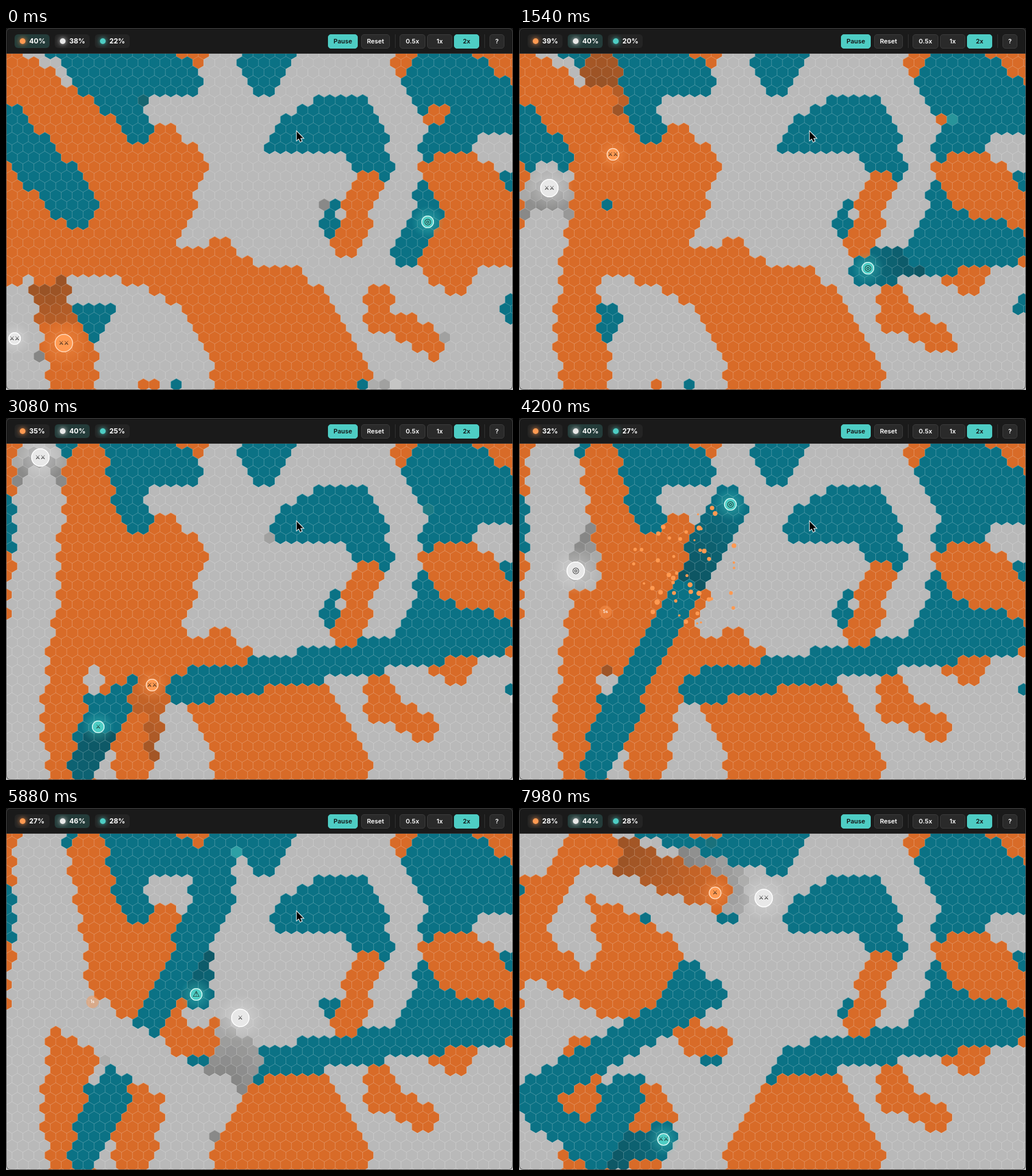
An HTML page with a canvas for the animation above (8 s loop, 885x633 px).

```html
<!DOCTYPE html>
<html lang="en">
<head>
<meta charset="utf-8">
<title>Hex territory</title>
<style>
html, body { margin: 0; width: 100%; height: 100%; overflow: hidden; background: #1a1a1a; }
#stage { position: relative; width: 885px; height: 633px; overflow: hidden; font: 600 11px Inter, sans-serif; color: #fff; }
canvas { position: absolute; left: 0; top: 0; }
header { position: absolute; left: 0; top: 0; width: 885px; height: 45px; background: #1a1a1a; border-bottom: 1px solid #333; box-sizing: border-box; }
header * { position: absolute; box-sizing: border-box; }
.chip { top: 11px; width: 61px; height: 24px; border-radius: 6px; background: #242424; font-weight: 700; font-size: 12px; line-height: 24px; }
.chip.lead { background: #243c3a; }
.chip i { left: 9px; top: 7px; width: 10px; height: 10px; border-radius: 50%; box-shadow: 0 0 8px currentColor; background: currentColor; }
.chip span { left: 26px; }
.button { top: 11px; height: 25px; line-height: 23px; text-align: center; border: 1px solid #3c3c3c; border-radius: 5px; background: #2a2a2a; }
.button.on { background: #4ecdc4; border-color: #4ecdc4; color: #111; }
.rule { top: 11px; width: 1px; height: 24px; background: #333; }
#frame { position: absolute; inset: 0; border: 1px solid #444; border-radius: 8px; }
</style>
</head>
<body>
<div id="stage">
  <canvas id="board" width="885" height="633"></canvas>
  <header id="bar">
    <div class="button on" style="left:562px;width:52px">Pause</div>
    <div class="button" style="left:620px;width:50px">Reset</div>
    <div class="rule" style="left:679px"></div>
    <div class="button" style="left:687px;width:45px">0.5x</div>
    <div class="button" style="left:735px;width:44px">1x</div>
    <div class="button on" style="left:782px;width:44px">2x</div>
    <div class="rule" style="left:835px"></div>
    <div class="button" style="left:844px;width:26px">?</div>
  </header>
  <div id="frame"></div>
</div>
<script>
const LOOP = 8000, START = -490, STEP = 70, FADE = 450;
const COLS = 48, ROWS = 37, HEX_W = 19.13, HEX_R = HEX_W / Math.sqrt(3);
const ORANGE = 0, WHITE = 1, TEAL = 2;
const DEATH = 3750, RESPAWN = 6250, POINTER_GONE = 6860;
const ctx = document.getElementById('board').getContext('2d');
const rand = n => { const v = Math.sin(n * 12.9898 + 4.1) * 43758.5453; return v - Math.floor(v); };
const lerp = (a, b, u) => a + (b - a) * u;
const rgb = c => `rgb(${c.map(Math.round)})`;
const mix = (a, b, u) => a.map((v, i) => lerp(v, b[i], u));

// each leg: arrival time, then the bounce points and the end, taken at constant speed
const teams = [
  { base: [216, 107, 40], dark: [152, 82, 38], light: [255, 154, 82], rim: '#ffd9bd', reach: 31,
    size: t => t < 700 ? 16 : 11, share: [40, 39, 35, 32, 27, 26, 28],
    icons: [[0, '⚔⚔'], [RESPAWN, '⚔']],
    legs: [[-450, 68, 425], [0, 101, 551], [1540, 106, 618, 118, 300, 145, 60, 164, 221], [3080, 225, 620, 255, 467],
      [DEATH, 300, 255], [RESPAWN, 151, 339], [6500, 151, 339], [7140, 12, 245, 33, 176], [LOOP, 112, 56, 351, 152]] },
  { base: [185, 185, 185], dark: [132, 132, 131], light: [232, 232, 232], rim: '#fff', reach: 41,
    size: t => t < 700 ? 11 : 16, share: [38, 40, 40, 40, 46, 45, 44],
    icons: [[0, '⚔⚔'], [3600, '◎'], [5000, '⚔'], [6500, '⚔⚔']],
    legs: [[-450, 35, 610], [0, 15, 543], [1540, 53, 280], [3080, 60, 69], [4200, 61, 60, 99, 267],
      [5880, 105, 345, 360, 520, 405, 440, 409, 367], [7140, 415, 315, 240, 150, 20, 80, 99, 55], [LOOP, 435, 160]] },
  { base: [11, 114, 133], dark: [14, 84, 97], light: [78, 205, 196], rim: '#d5f5f2', reach: 28,
    size: () => 11, share: [22, 20, 25, 27, 28, 28, 28],
    icons: [[0, '◎'], [2300, '⚔'], [3600, '◎'], [5000, '⚠'], [6500, '⚔⚔']],
    legs: [[0, 736, 339], [1540, 872, 380, 609, 420], [3080, 200, 490, 132, 615, 161, 540], [4200, 369, 151],
      [5880, 374, 60, 332, 210, 332, 326], [7140, 12, 505, 36, 529], [LOOP, 140, 610, 258, 578]] }
];
const shareTimes = [0, 1540, 3080, 4200, 5880, 7140, LOOP];

function timeline(legs) {
  const keys = [];
  for (const [arrival, ...coords] of legs) {
    let from = keys.at(-1) || { time: arrival, x: coords[0], y: coords[1] };
    const left = from.time, stops = [];
    for (let i = 0, way = 0; i < coords.length; i += 2) {
      const [x, y] = coords.slice(i, i + 2);
      way += Math.hypot(x - from.x, y - from.y);
      stops.push(from = { x, y, way });
    }
    for (const s of stops) keys.push({ x: s.x, y: s.y, time: from.way ? lerp(left, arrival, s.way / from.way) : arrival });
  }
  return keys;
}
for (const team of teams) team.keys = timeline(team.legs);

// starting land, later ones on top; with a radius the points form a thick line, without one an outline
const land = [
  [ORANGE, 0, '-9,20 235,180 290,166 354,242 298,390 375,368 430,415 518,415 645,600 610,645 358,645 355,560 305,482 180,433 45,433 -9,468'],
  [ORANGE, 0, '68,515 140,515 162,570 160,645 30,645'],
  [TEAL, 0, '62,30 165,150 195,152 215,202 245,202 258,168 225,150 235,118 335,118 346,90 330,30'],
  [ORANGE, 0, '290,30 362,30 330,74'],
  [TEAL, 41, '0,175 118,305'],
  [TEAL, 0, '403,30 408,80 430,118 468,118 510,30'],
  [TEAL, 0, '540,118 632,118 682,243 660,268 608,250 595,218 455,218 470,167'],
  [TEAL, 0, '536,301 590,301 568,372'],
  [ORANGE, 24, '630,278 612,330 597,375'],
  [TEAL, 0, '710,30 690,90 735,165 720,228 765,230 815,218 825,185 899,185 899,30'],
  [ORANGE, 0, '668,30 718,30 690,88'],
  [ORANGE, 0, '795,30 899,30 899,112'],
  [ORANGE, 13, '742,152 760,152'],
  [ORANGE, 0, '728,236 770,218 815,218 899,290 899,417 823,417 800,467 768,467 720,415'],
  [TEAL, 21, '728,288 742,325 697,396'],
  [TEAL, 21, '890,262'],
  [TEAL, 20, '888,491'],
  [ORANGE, 23, '652,470 655,507 750,552'],
  [TEAL, 0, '118,483 186,483 180,520 152,552'],
  [TEAL, 15, '5,624'],
  [ORANGE, 11, '250,624'], [TEAL, 11, '289,624'], [TEAL, 11, '632,624'], [ORANGE, 11, '671,624']
].map(([team, radius, text]) => ({ team, radius, points: text.split(' ').map(p => p.split(',').map(Number)) }));

function lineDistance(x, y, [ax, ay], [bx, by]) {
  const dx = bx - ax, dy = by - ay;
  const u = Math.max(0, Math.min(1, ((x - ax) * dx + (y - ay) * dy) / (dx * dx + dy * dy || 1)));
  return Math.hypot(x - ax - u * dx, y - ay - u * dy);
}

function covers({ radius, points }, x, y) {
  if (radius) return points.some((p, i) => lineDistance(x, y, points[Math.max(0, i - 1)], p) < radius);
  let hit = false;
  points.forEach(([ax, ay], i) => {
    const [bx, by] = points.at(i - 1);
    if (ay > y !== by > y && x < (bx - ax) * (y - ay) / (by - ay) + ax) hit = !hit;
  });
  return hit;
}

function hex(path, x, y, r) {
  for (let k = 0; k < 6; k++) {
    const a = (k + 0.5) * Math.PI / 3;
    path[k ? 'lineTo' : 'moveTo'](x + r * Math.cos(a), y + r * Math.sin(a));
  }
  path.closePath();
}

const cells = [], grid = new Path2D();
for (let r = 0; r < ROWS; r++) for (let c = 0; c < COLS; c++) {
  const x = 0.8 + HEX_W * (c + r % 2 / 2), y = 44.2 + HEX_R * 1.5 * r;
  const owner = land.findLast(l => covers(l, x, y))?.team ?? WHITE;
  const shape = new Path2D();
  hex(shape, x, y, HEX_R + 0.3);
  hex(grid, x, y, HEX_R);
  cells.push({ x, y, r, c, owner, shape, log: [{ time: -1e5, team: owner }] });
}
const cellAt = (r, c) => c >= 0 && c < COLS ? cells[r * COLS + c] : undefined;
for (const cell of cells) {
  const { r, c } = cell, s = c + r % 2;
  cell.near = [cellAt(r, c - 1), cellAt(r, c + 1), cellAt(r - 1, s - 1), cellAt(r - 1, s),
    cellAt(r + 1, s - 1), cellAt(r + 1, s)].filter(Boolean);
}

function position(team, t) {
  const { keys } = team;
  if (t < keys[0].time || team === teams[ORANGE] && t >= DEATH && t < RESPAWN) return null;
  const i = Math.max(1, keys.findIndex(k => k.time >= t));
  const a = keys[i - 1], b = keys[i], u = (t - a.time) / (b.time - a.time);
  return [lerp(a.x, b.x, u), lerp(a.y, b.y, u)];
}

function claim(cell, team, time, lone) {
  cell.owner = team;
  cell.log.push({ time, team, lone });
}

// cells mostly surrounded by one rival change hands after a while
function erode(time) {
  const flips = [];
  cells.forEach((cell, i) => {
    const count = [0, 0, 0];
    for (const n of cell.near) count[n.owner]++;
    const rival = count.findIndex((n, k) => n >= 4 && k !== cell.owner);
    if (rival >= 0 && rand(i * 7.3 + time) < 0.05) flips.push([cell, rival]);
  });
  for (const [cell, rival] of flips) claim(cell, rival, time, true);
}

for (let t = START; t <= LOOP; t += 10) {
  teams.forEach((team, k) => {
    const p = position(team, t);
    if (!p) return;
    for (const cell of cells)
      if (cell.owner !== k && Math.hypot(cell.x - p[0], cell.y - p[1]) < team.reach) claim(cell, k, t);
  });
  if (t % STEP === 0) erode(t);
}

function disc(x, y, r, fill) {
  ctx.beginPath();
  ctx.arc(x, y, r, 0, 7);
  ctx.fillStyle = fill;
  ctx.fill();
}

function label(text, x, y, font, fill) {
  ctx.font = font;
  ctx.fillStyle = fill;
  ctx.textAlign = 'center';
  ctx.textBaseline = 'middle';
  ctx.fillText(text, x, y);
}

// claimed land darkens with age, then snaps back to its plain colour
function drawCells(t) {
  for (const cell of cells) {
    const { time, team, lone } = cell.log.findLast(e => e.time <= t);
    const { base, dark, light } = teams[team];
    const age = (t - time) / FADE;
    const fresh = lone ? mix(base, light, 0.5) : base;
    ctx.fillStyle = rgb(age < 1 ? mix(fresh, dark, age) : base);
    ctx.fill(cell.shape);
  }
  ctx.strokeStyle = 'rgba(255,255,255,.13)';
  ctx.lineWidth = 1;
  ctx.stroke(grid);
}

function drawBall(team, t) {
  const p = position(team, t);
  if (!p) return;
  const [x, y] = p, r = team.size(t), glow = ctx.createRadialGradient(x, y, r, x, y, r * 2.6);
  glow.addColorStop(0, `rgba(${team.light},.3)`);
  glow.addColorStop(1, `rgba(${team.light},0)`);
  disc(x, y, r * 2.6, glow);
  disc(x, y, r, rgb(team.light));
  ctx.beginPath();
  ctx.arc(x, y, r - 0.7, 0, 7);
  ctx.strokeStyle = team.rim;
  ctx.lineWidth = 1.5;
  ctx.stroke();
  const icon = team.icons.findLast(e => e[0] <= t)[1];
  label(icon, x, y, `${icon[0] === '⚔' ? 10 : 14}px "DejaVu Sans", sans-serif`, '#111');
}

function drawDeath(t) {
  if (t < DEATH || t >= RESPAWN) return;
  const age = (t - DEATH) / 1000;
  ctx.globalAlpha = 0.45;
  disc(151, 339, 11, '#ff9a52');
  ctx.globalAlpha = 0.9;
  label(Math.ceil((RESPAWN - t) / 500) + 's', 151, 339, '700 7px Inter, sans-serif', '#fff');
  ctx.globalAlpha = Math.max(0, Math.min(1, 2.1 - age * 2.4));
  for (let i = 0; i < 46 && age < 0.9; i++) {
    const a = rand(i) * Math.PI * 2, d = (50 + 210 * rand(i + 60)) * age;
    disc(300 + d * Math.cos(a), 255 + d * Math.sin(a) * 0.9, (2 + 3.4 * rand(i + 120)) * (1 - age * 0.25), '#ff9a52');
  }
  ctx.globalAlpha = 1;
}

const pointer = new Path2D('M507.5 181v15.5l3.6-3.2 2.5 5.6 2.6-1.1-2.4-5.4h5z');
function drawPointer() {
  ctx.lineWidth = 2;
  ctx.strokeStyle = '#fff';
  ctx.stroke(pointer);
  ctx.fillStyle = '#000';
  ctx.fill(pointer);
}

const chips = teams.map((team, k) => {
  const chip = document.createElement('div');
  chip.style.left = 14.5 + 70 * k + 'px';
  chip.innerHTML = `<i style="color:${rgb(team.light)}"></i><span></span>`;
  document.getElementById('bar').append(chip);
  return chip;
});

function updateChips(t) {
  const n = Math.max(1, shareTimes.findIndex(s => s >= t));
  const u = (t - shareTimes[n - 1]) / (shareTimes[n] - shareTimes[n - 1]);
  const shares = teams.map(team => lerp(team.share[n - 1], team.share[n], u));
  const best = Math.max(...shares);
  chips.forEach((chip, k) => {
    chip.className = shares[k] === best ? 'chip lead' : 'chip';
    chip.lastChild.textContent = Math.round(shares[k]) + '%';
  });
}

function render(now) {
  const t = Math.floor(now % LOOP / STEP) * STEP;
  drawCells(t);
  drawDeath(t);
  for (const team of teams) drawBall(team, t);
  if (t < POINTER_GONE) drawPointer();
  updateChips(t);
  requestAnimationFrame(render);
}
requestAnimationFrame(render);
</script>
</body>
</html>
```
